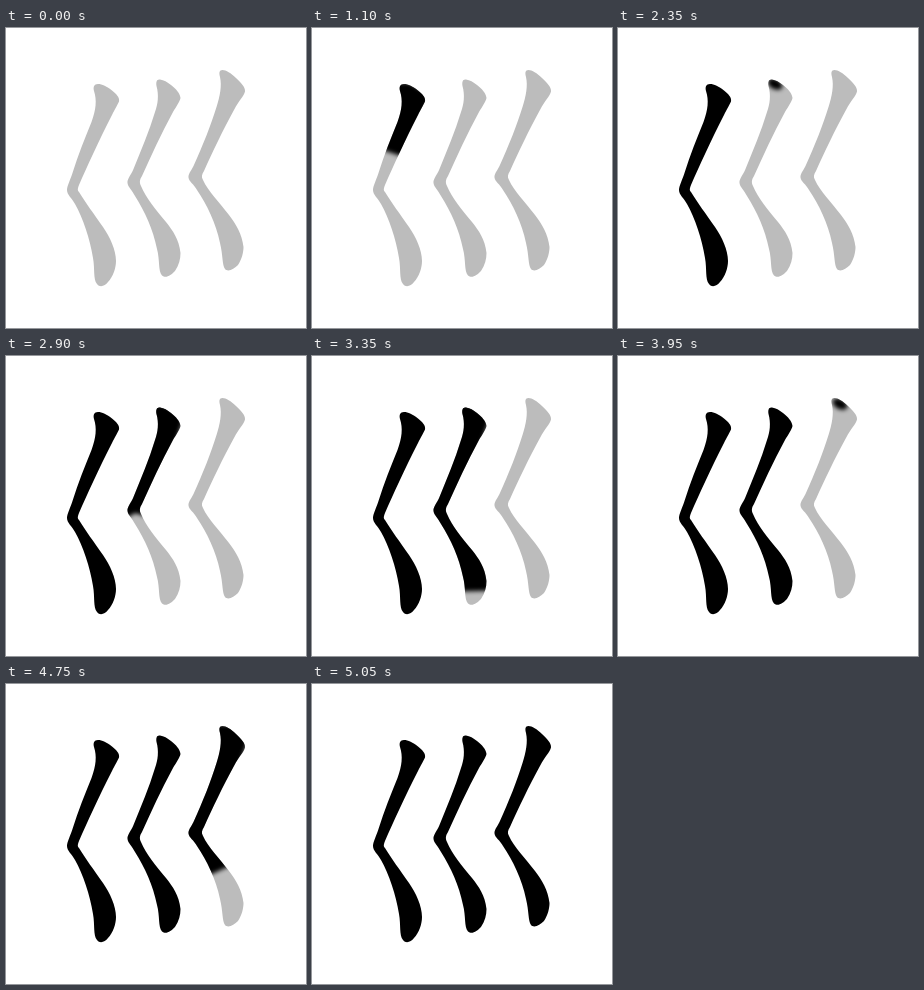
These frames come from a looping animation (300x300 px, 6.05 s). An HTML page with a canvas:

```html
<!DOCTYPE html>
<html lang="en">
<head>
<meta charset="utf-8">
<title>Stroke order</title>
<style>
html, body { margin: 0; width: 100%; height: 100%; overflow: hidden; background: #fff; }
canvas { display: block; }
</style>
</head>
<body>
<canvas id="stage" width="300" height="300"></canvas>
<script>
const ctx = document.getElementById('stage').getContext('2d');
const LOOP = 6050;

// dx, dy: shift of the shared brush path
const strokes = [
  { dx: 0, dy: 0, path: 'M92 56C88 56 87 59 88 63C91 72 90 82 85.5 94C79 110 72 127 66.5 145C65 150 61 158 61 162C61 167 66 170 69 176C77 190 84 211 87 230C89 241 87 251 91 256C94 260 99 258 102 254C107 249 110 240 110 233C110 222 104 209 97 199C88 186 79 174 73 164C71 162 72 160 73 157C81 139 93 112 106 87C109 81 112 76 113 73.5C114 69 110 66 106 62.5C101 58.5 96 56 92 56Z' },
  { dx: 60, dy: -6, path: 'M154 51.5C150.5 51 150 54 150.5 58C153 67 152 76 149 84C143 104 135 122 127.5 141C125 147 121 151 121.5 155C122 159 126 162 129 168C139 184 147 201 151 221C154 232 152 243 156 247.5C160 251 165 247 169 243C173 237 174.5 231 174.5 225C173 211 167 203 160 194C150 182 140 170 135 158C133 154 134 151 136 148C145 128 155 106 167 84C170 79 174 73 174.5 70C174 65 170 61 165 57C161 54 158 52 154 51.5Z' },
  { dx: 125, dy: -14, path: 'M216.5 42C213 42 213 45 214 49C216 58 214 68 210.5 79C205 97 197 117 187.5 138C185 143 182 146 182.5 149.5C183 154 188 156 191 162C201 177 210 195 214 215C217 227 216 237 219 241C222 244.5 228 241 232 237C236 231 237.5 224 237.5 219C236 206 230 196 223 187C213 174 202 163 197 152C195 149 196 146 198 143C206 125 217 102 228.5 81C232 74 238 68 239 63.5C239.5 59 235 55 230 50C225 45 220 42 216.5 42Z' }
].map((s, i) => ({ ...s, shape: new Path2D(s.path), start: 750 + 1600 * i }));

const brush = new Path2D('M100 58L66 162L80 187L97 225L98 262');

// Ink steps: time after the stroke starts, and length of brush path covered
const times = [0, 100, 250, 350, 450, 550, 700, 800, 900, 1000, 1100];
const lengths = [0, 28, 49, 70, 91, 112, 133, 154, 175, 196];

function drawStroke({ dx, dy, shape, start }, t) {
  const step = times.filter(d => start + d <= t).length - 1;
  const done = step === times.length - 1;
  ctx.fillStyle = done ? '#000' : '#bcbcbc';
  ctx.fill(shape);
  if (step < 0 || done) return;

  ctx.save();
  ctx.clip(shape);
  ctx.translate(dx, dy);
  ctx.filter = 'blur(2px)';
  ctx.fillStyle = '#000';
  ctx.beginPath();
  ctx.ellipse(97, 62, 8, 5, 0.5, 0, 2 * Math.PI);
  ctx.fill();
  if (step > 0) {
    ctx.lineWidth = 40;
    ctx.lineJoin = 'round';
    ctx.setLineDash([lengths[step], 999]);
    ctx.stroke(brush);
  }
  ctx.restore();
}

function frame() {
  const t = performance.now() % LOOP;
  ctx.fillStyle = '#fff';
  ctx.fillRect(0, 0, 300, 300);
  strokes.forEach(s => drawStroke(s, t));
  requestAnimationFrame(frame);
}
frame();
</script>
</body>
</html>
```
